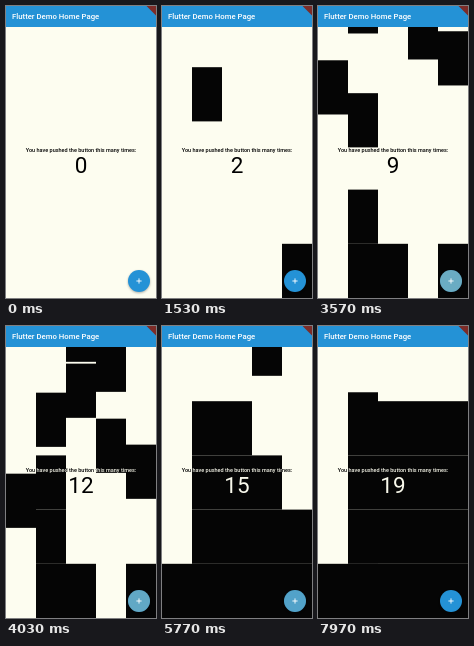
Animation, 150 px wide and 292 px high, one loop 8 s. Source, as an HTML page:

```html
<!DOCTYPE html>
<html lang="en">
<head>
<meta charset="utf-8">
<title>Falling blocks counter</title>
<style>
  html, body { margin: 0; width: 100%; height: 100%; overflow: hidden; background: #fdfdf0; }
  svg { display: block; width: 150px; height: 292px; isolation: isolate; }
  text { font-family: Roboto, sans-serif; }
  .label { fill: #fdfdf0; mix-blend-mode: difference; text-anchor: middle; }
  .bar { filter: drop-shadow(0 .7px .5px rgba(0, 0, 0, .35)); }
  .fab { filter: drop-shadow(0 1.4px 1.2px rgba(0, 0, 0, .3)); }
</style>
</head>
<body>
<svg viewBox="0 0 150 292">
  <rect width="150" height="292" fill="#fdfdf0"/>
  <g id="blocks" fill="#050505"></g>
  <text class="label" x="75" y="146" font-size="5.5" font-weight="500">You have pushed the button this many times:</text>
  <text class="label" id="count" x="75" y="167.2" font-size="22.5">0</text>
  <rect class="bar" width="150" height="21" fill="#2492d6"/>
  <text x="6" y="13.3" font-size="7.75" font-weight="500" fill="#fff">Flutter Demo Home Page</text>
  <path d="M140.5 0H150V9.5Z" fill="#7c2c28"/>
  <circle class="fab" cx="133" cy="275" r="11" fill="#2492d6"/>
  <circle id="splash" cx="133" cy="275" r="11" fill="#cfd0a8" opacity="0"/>
  <path d="M130.4 275h5.2M133 272.4v5.2" stroke="#fff" stroke-width=".9"/>
</svg>
<script>
  const LOOP = 8000, SPEED = 0.203, START_Y = -33;
  const WIDTH = 30, HEIGHT = 54.2, FLOOR = 292, MAX_STACK = 4;

  // [time of push in ms, column]
  const pushes = [
    [130, 4], [1067, 1], [1967, 2], [2386, 1], [2979, 1], [3141, 0], [3284, 4],
    [3412, 3], [3540, 1], [3683, 2], [3811, 3], [3959, 2], [4750, 3], [5200, 2],
    [5630, 3], [6049, 4], [6402, 1], [6900, 4], [7482, 1]
  ];

  const layer = document.getElementById('blocks');
  const count = document.getElementById('count');
  const splash = document.getElementById('splash');
  const stacks = [0, 0, 0, 0, 0];

  const blocks = pushes.map(([time, column]) => {
    // A block that finds its column full drops through to the floor.
    const level = stacks[column] < MAX_STACK ? ++stacks[column] : 1;
    const node = document.createElementNS('http://www.w3.org/2000/svg', 'rect');
    node.setAttribute('x', column * WIDTH);
    node.setAttribute('width', WIDTH);
    node.setAttribute('height', HEIGHT);
    layer.append(node);
    return { node, time, rest: FLOOR - level * HEIGHT };
  });

  function draw(t) {
    let total = 0, lastPush = -Infinity;
    for (const { node, time, rest } of blocks) {
      const pushed = t >= time;
      if (pushed) {
        total++;
        lastPush = time;
      }
      const y = pushed ? Math.min(rest, START_Y + (t - time) * SPEED) : -HEIGHT;
      node.setAttribute('y', y.toFixed(2));
    }
    count.textContent = total;
    splash.setAttribute('opacity', 0.45 * Math.max(0, 1 - (t - lastPush) / 350));
  }

  const origin = performance.now();
  function tick() {
    draw((performance.now() - origin) % LOOP);
    requestAnimationFrame(tick);
  }
  tick();
</script>
</body>
</html>
```
